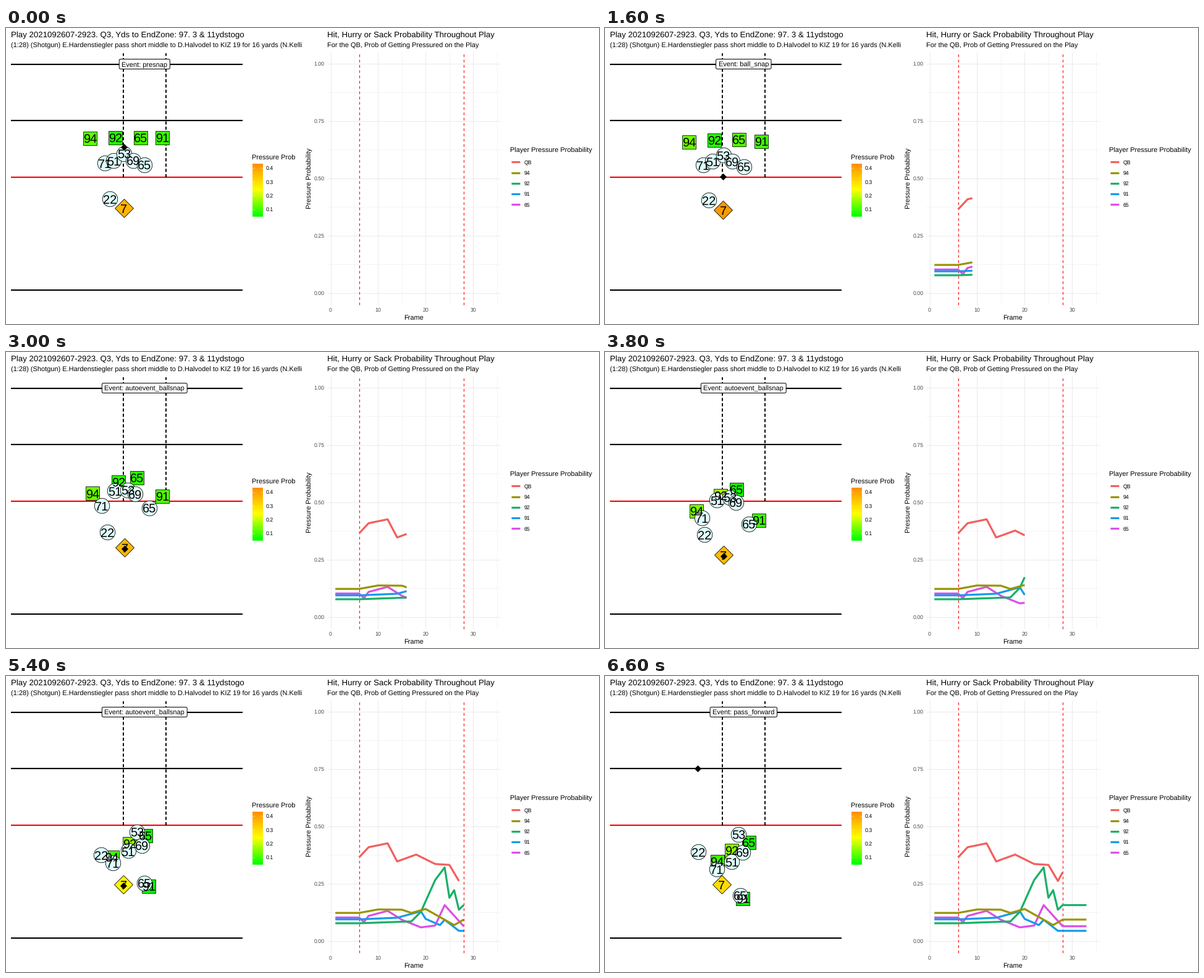
A matplotlib script that plays this animation: 960 px wide and 480 px high, repeating every 8 s.

```python
import numpy as np
import matplotlib as mpl
import matplotlib.pyplot as plt
from matplotlib.animation import FuncAnimation
from matplotlib.patches import FancyBboxPatch, Rectangle

mpl.rcParams["font.family"] = "Liberation Sans"
mpl.rcParams["text.hinting"] = "none"

W, H, PX = 960, 480, 0.75  # PX: points per pixel at 96 dpi
STEPS, INTERVAL, LAST = 40, 200, 33
SNAP, PASS = 6, 28

# Each player: number, then where he starts, is halfway and ends
DEFENSE = [
    ("94", (136, 179), (148, 258), (181.5, 301)),
    ("92", (177, 178), (187, 233), (205, 283)),
    ("91", (253, 178), (249, 273), (223, 361)),
    ("65", (218, 178), (213, 223), (233, 270)),
]
OFFENSE = [
    ("22", (168, 277), (161, 296), (151, 285)),
    ("71", (160, 219), (157, 269), (181, 313)),
    ("51", (174, 215), (181, 240), (205, 301)),
    ("53", (191, 204), (202, 236), (216, 257)),
    ("69", (206, 215), (212, 244), (223, 286)),
    ("65", (224, 222), (233, 279), (219, 356)),
]
PASSER = ("7", (191, 292), (192, 329), (189, 338))
CENTER, CATCH = np.array([191, 193]), np.array([150, 150])

# Turning points of the pressure probability: step, thousandths
CURVES = {
    "QB": ("#F2605C", [(6, 365), (8, 409), (12, 426), (14, 347), (18, 377),
                       (22, 336), (25, 332), (27, 262), (28, 300)]),
    "94": ("#989400", [(6, 123), (10, 138), (15, 137), (17, 123), (20, 140),
                       (26, 70), (28, 94)]),
    "92": ("#18B068", [(6, 78), (17, 86), (19, 128), (22, 266), (24, 321),
                       (25, 189), (26, 222), (27, 137), (28, 157)]),
    "91": ("#149BEB", [(6, 95), (14, 102), (19, 130), (20, 97), (23, 70),
                       (24, 93), (27, 45)]),
    "65": ("#DD4EE8", [(6, 103), (7, 83), (8, 110), (12, 132), (15, 93),
                       (19, 60), (22, 68), (24, 157), (28, 65)]),
}
EVENTS = [(0, "presnap"), (SNAP, "ball_snap"), (9, "autoevent_ballsnap"),
          (PASS, "pass_forward")]


def ramp(p):
    """Green to yellow to dark orange."""
    t = np.clip((np.asarray(p, float) - 0.243) / 0.193, -1, 1)
    red = np.where(t < 0, 1 + t, 1)
    green = np.where(t > 0, 1 - t * 115 / 255, 1)
    return np.stack([red, green, 0 * t], axis=-1)


def run(path, i):
    """Eased parabola through start, halfway point and end."""
    a, b, c = np.array(path)
    u = np.clip((i - SNAP + 1) / (LAST - SNAP + 1), 0, 1)
    s = u * u * (3 - 2 * u)
    return a + s * (4 * b - 3 * a - c) + 2 * s * s * (a - 2 * b + c)


def ball_at(i):
    """Snapped to the passer, carried, then thrown."""
    carry = run(PASSER[1:], i) + (0, 2)
    if i < PASS:
        return CENTER + (carry - CENTER) * np.clip((i - SNAP + 1) / 6.5, 0, 1)
    hand = run(PASSER[1:], PASS - 1) + (-3, 6)
    return hand + (CATCH - hand) * (i - PASS + 1) / (LAST - PASS + 1)


def prob(name, f):
    steps, values = zip(*CURVES[name][1])
    return np.interp(f, steps, values) / 1000


def fx(f):
    return 525.5 + 7.693 * np.asarray(f)


def py(p):
    return 430 - 372.5 * np.asarray(p)


fig = plt.figure(figsize=(10, 5), dpi=96, facecolor="white")
ax = fig.add_axes([0, 0, 1, 1])
ax.axis("off")


def text(x, y, s, size=11, color="black", **kw):
    return ax.text(x, y, s, fontsize=size * PX, color=color, **kw)


def line(x, y, color="black", lw=1.07, z=1, **kw):
    kw.setdefault("solid_capstyle", "butt")
    return ax.plot(x, y, color=color, lw=lw * PX, zorder=z, **kw)[0]


def marker(shape, size, face, z):
    return ax.plot([], [], shape, ms=size * PX, mfc=face, mec="black",
                   mew=0.8 * PX, zorder=z)[0]


# Field
text(8, 15, "Play 2021092607-2923. Q3, Yds to EndZone: 97. 3 & 11ydstogo", 13.2)
summary = text(8, 32, "(1:28) (Shotgun) E.Hardenstiegler pass short middle to "
               "D.Halvodel to KIZ 19 for 16 yards (N.Kelliland", clip_on=True)
summary.set_clip_path(Rectangle((0, 0), W / 2, H, transform=ax.transData))
for y, c in ((59, "black"), (150, "black"), (242, "red"), (425, "black")):
    line([8, 382.5], [y, y], c, 2.13)
for x in (190, 258.5):
    line([x, x], [242, 41], lw=1.9, ls=(0, (2.7, 1.8)))

text(398.5, 214, "Pressure Prob")
bar = ramp(np.linspace(0.431, 0.046, 86))[:, None, :]
ax.imshow(bar, extent=(399, 416, 306, 220), aspect="auto", zorder=1)
for p in (0.1, 0.2, 0.3, 0.4):
    y = 316.4 - 223.5 * p
    for x in (399, 412.6):
        line([x, x + 3.4], [y, y], "white", 0.5, 2)
    text(421, y + 3.2, f"{p:.1f}", 8.8)

# Chart
text(520, 15, "Hit, Hurry or Sack Probability Throughout Play", 13.2)
text(520, 32, "For the QB, Prob of Getting Pressured on the Play")
for f in range(0, 36, 5):
    line(fx([f, f]), [39, 448.5], "#EBEBEB", 0.53 if f % 10 else 1.07)
    if f % 10 == 0:
        text(fx(f), 460, str(f), 8.8, "#4D4D4D", ha="center")
for k in range(9):
    y = py(k / 8)
    line([520.3, 799.7], [y, y], "#EBEBEB", 0.53 if k % 2 else 1.07)
    if k % 2 == 0:
        text(515.7, y + 3.2, f"{k / 8:.2f}", 8.8, "#4D4D4D", ha="right")
for f in (SNAP, PASS):
    line(fx([f, f]), [448.5, 39], "red", z=2, ls=(0, (4, 4)))
text(660, 473, "Frame", ha="center")
text(497, 244, "Pressure Probability", rotation=90, ha="right", va="center")

text(816, 202, "Player Pressure Probability")
curves = {}
for k, (name, (c, _)) in enumerate(CURVES.items()):
    y = 217.3 + 17.28 * k
    line([818, 832], [y, y], c, 3.2)
    text(839, y + 3.2, name, 8.8)
    curves[name] = line([], [], c, 3.2, 8 - k, solid_joinstyle="round")

# Players
players = []
for z, shape, size, squad in ((10, "s", 21.5, DEFENSE), (11, "o", 24.5, OFFENSE),
                              (12, "D", 21.2, [PASSER])):
    for num, *path in squad:
        dot = marker(shape, size, "#E0FFFF", z)
        label = text(0, 0, num, 20, ha="center", zorder=13)
        rated = {"s": num, "D": "QB"}.get(shape)
        players.append((dot, label, path, rated))
ball = marker("D", 7.4, "black", 14)

box = FancyBboxPatch((183, 50.5), 82, 16, boxstyle="round,pad=0,rounding_size=2.2",
                     fc="white", ec="black", lw=PX, zorder=15)
ax.add_patch(box)
event = text(224.3, 62.8, "", ha="center", zorder=16)

ax.set_xlim(0, W)
ax.set_ylim(H, 0)


def update(n):
    i = min(n, LAST)
    f = min(i + 1, LAST)
    # The passer's rating lags at the pass and stops there
    ends = {"QB": min(f, PASS if i >= PASS else PASS - 1)}

    for dot, label, path, rated in players:
        x, y = run(path, i)
        dot.set_data([x], [y])
        label.set_position((x, y + 8))
        if rated:
            dot.set_markerfacecolor(ramp(prob(rated, ends.get(rated, f))))
    x, y = ball_at(i)
    ball.set_data([x], [y])

    for name, curve in curves.items():
        fs = np.arange(SNAP if name == "QB" else 1, ends.get(name, f) + 1)
        curve.set_data(fx(fs), py(prob(name, fs)))

    event.set_text("Event: " + [s for start, s in EVENTS if start <= i][-1])
    w = event.get_window_extent().width + 8
    box.set_bounds(224.3 - w / 2, 50.5, w, 16)
    return []


anim = FuncAnimation(fig, update, frames=STEPS, interval=INTERVAL,
                     repeat=True, repeat_delay=0, blit=False)
plt.show()
```
